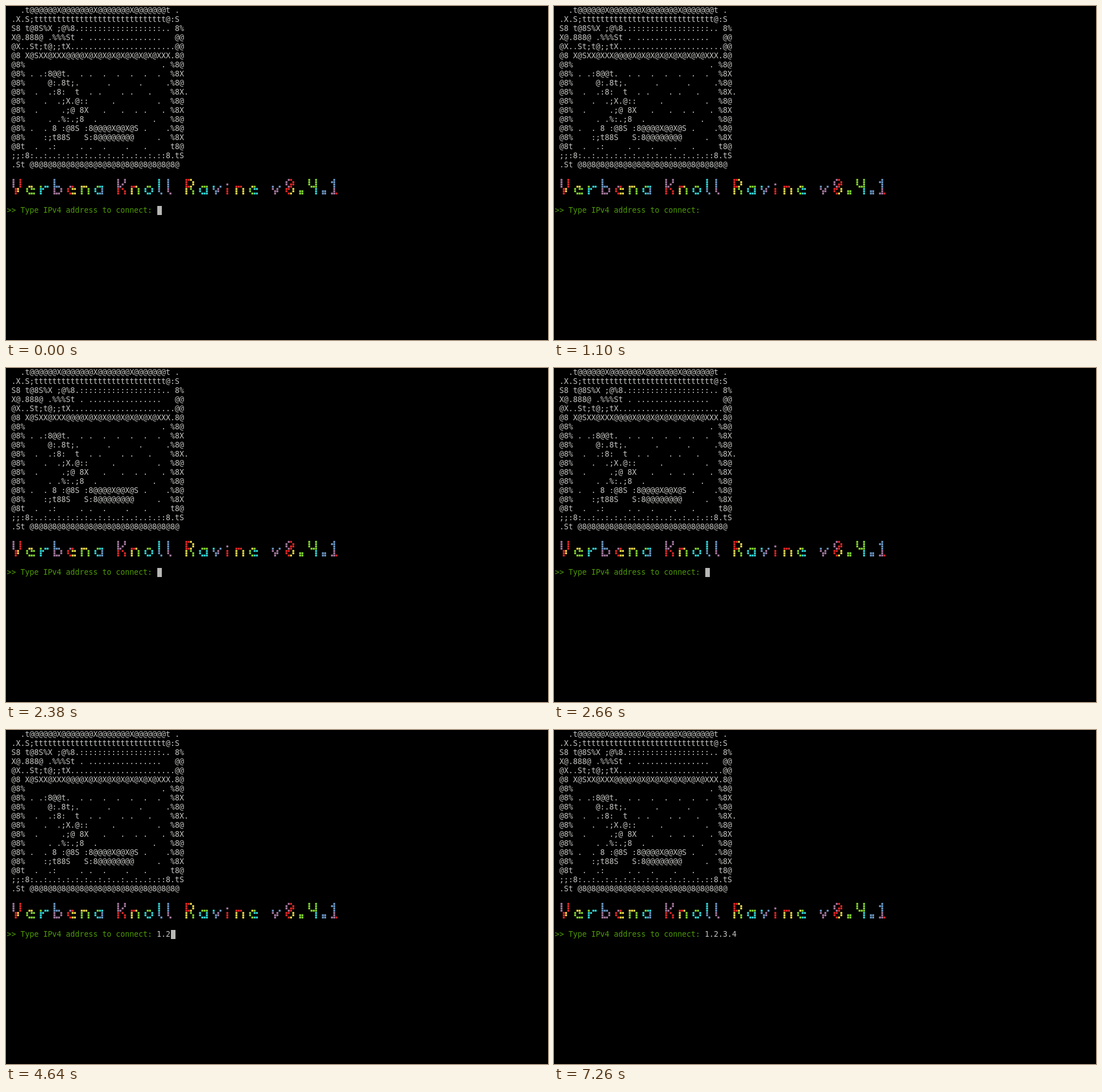
An HTML page with a canvas for the animation above (8 s loop, 953 by 588 pixels).

```html
<!DOCTYPE html>
<html lang="en">
<head>
<meta charset="utf-8">
<title>Terminal prompt</title>
<style>
  html, body { margin: 0; width: 100%; height: 100%; overflow: hidden; background: #000; }
  pre {
    position: absolute; left: 1.5px; margin: 0; color: #c4c6c2;
    font: 13.288px/16px "DejaVu Sans Mono", monospace;
  }
  #art { top: 0; }
  #prompt { top: 352px; }
  #prompt b { font-weight: normal; color: #4e9a06; }
  #cursor { position: absolute; top: 352px; width: 8px; height: 16px; background: #b8b9b6; }
  canvas { position: absolute; left: 0; top: 304px; }
</style>
</head>
<body>
<pre id="art">
   .t@@@@@@X@@@@@@@X@@@@@@@X@@@@@@@t .
 .X.S;ttttttttttttttttttttttttttttt@:S
 S8 t@8S%X ;@%8.::::::::::::::::::.. 8%
 X@.888@ .%%%St . ................   @@
 @X..St;t@;;tX.......................@@
 @8 X@SXX@XXX@@@@X@X@X@X@X@X@X@X@XXX.8@
 @8%                              . %8@
 @8% . .:8@@t.  . .  .  .  .  .  .  %8X
 @8%     @:.8t;.      .      .     .%8@
 @8%  .  .:8:  t  . .    . .   .    %8X.
 @8%    .  .;X.@::     .         .  %8@
 @8%  .     .;@ 8X   .   .  . .   . %8X
 @8%     . .%:.;8  .            .   %8@
 @8% .  . 8 :@8S :8@@@@X@@X@S .    .%8@
 @8%    :;t88S   S:8@@@@@@@@     .  %8X
 @8t  .  .:     . .  .    .   .     t8@
 ;;:8:..:..:.:.:.:..:.:..:..:..:.::8.tS
 .St @8@8@8@8@8@8@8@8@8@8@8@8@8@8@8@8@
</pre>
<canvas id="title" width="953" height="32" role="img" aria-label="Verbena Knoll Ravine v0.4.1"></canvas>
<pre id="prompt"><b>&gt;&gt; Type IPv4 address to connect: </b><span id="typed"></span></pre>
<div id="cursor"></div>
<script>
const LOOP = 8000, LEFT = 1.5, CELL = 8, PROMPT_LENGTH = 33;

// Title lettering: each braille cell is a 2 x 4 block of dots.
const TITLE = [
  ' ⡇⢸ ⢀⡀ ⡀⣀ ⣇⡀ ⢀⡀ ⣀⡀ ⢀⣀   ⣇⠜ ⣀⡀ ⢀⡀ ⡇ ⡇   ⣏⡱ ⢀⣀ ⡀⢀ ⠄ ⣀⡀ ⢀⡀   ⡀⢀ ⢎⡵   ⢇⣸   ⢺',
  ' ⠸⠃ ⠣⠭ ⠏  ⠧⠜ ⠣⠭ ⠇⠸ ⠣⠼   ⠇⠱ ⠇⠸ ⠣⠜ ⠣ ⠣   ⠇⠱ ⠣⠼ ⠱⠃ ⠇ ⠇⠸ ⠣⠭   ⠱⠃ ⠫⠜ ⠶  ⠸ ⠶ ⠼⠄'
];
const RAINBOW = ['#ad7fa8', '#ef2929', '#fce94f', '#8ae234', '#34e2e2', '#729fcf'];
// Column and row of each braille bit.
const DOTS = [[0, 0], [0, 1], [0, 2], [1, 0], [1, 1], [1, 2], [0, 3], [1, 3]];

const KEYS = [[3500, '1'], [4060, '.'], [4480, '2'], [5020, '.'], [5180, '3'], [6020, '.'], [6080, '4']];
const CURSOR_OFF = [[1000, 2380], [7260, LOOP]];

const typed = document.getElementById('typed');
const cursor = document.getElementById('cursor');

function drawTitle() {
  const ctx = document.getElementById('title').getContext('2d');
  TITLE.forEach((line, row) => [...line].forEach((char, col) => {
    if (char === ' ') return;
    const bits = char.charCodeAt(0) - 0x2800;
    ctx.fillStyle = RAINBOW[((col >> 1) + row) % RAINBOW.length];
    DOTS.forEach(([x, y], bit) => {
      if (bits >> bit & 1) ctx.fillRect(LEFT + col * CELL + 2 + x * 4, row * 16 + y * 4 + 0.5, 3.3, 3.2);
    });
  }));
}

function render() {
  const t = performance.now() % LOOP;
  const text = KEYS.filter(([time]) => t >= time).map(([, key]) => key).join('');
  if (typed.textContent !== text) typed.textContent = text;
  cursor.style.left = LEFT + (PROMPT_LENGTH + text.length) * CELL + 'px';
  cursor.hidden = CURSOR_OFF.some(([from, to]) => t >= from && t < to);
  requestAnimationFrame(render);
}

drawTitle();
render();
</script>
</body>
</html>
```
